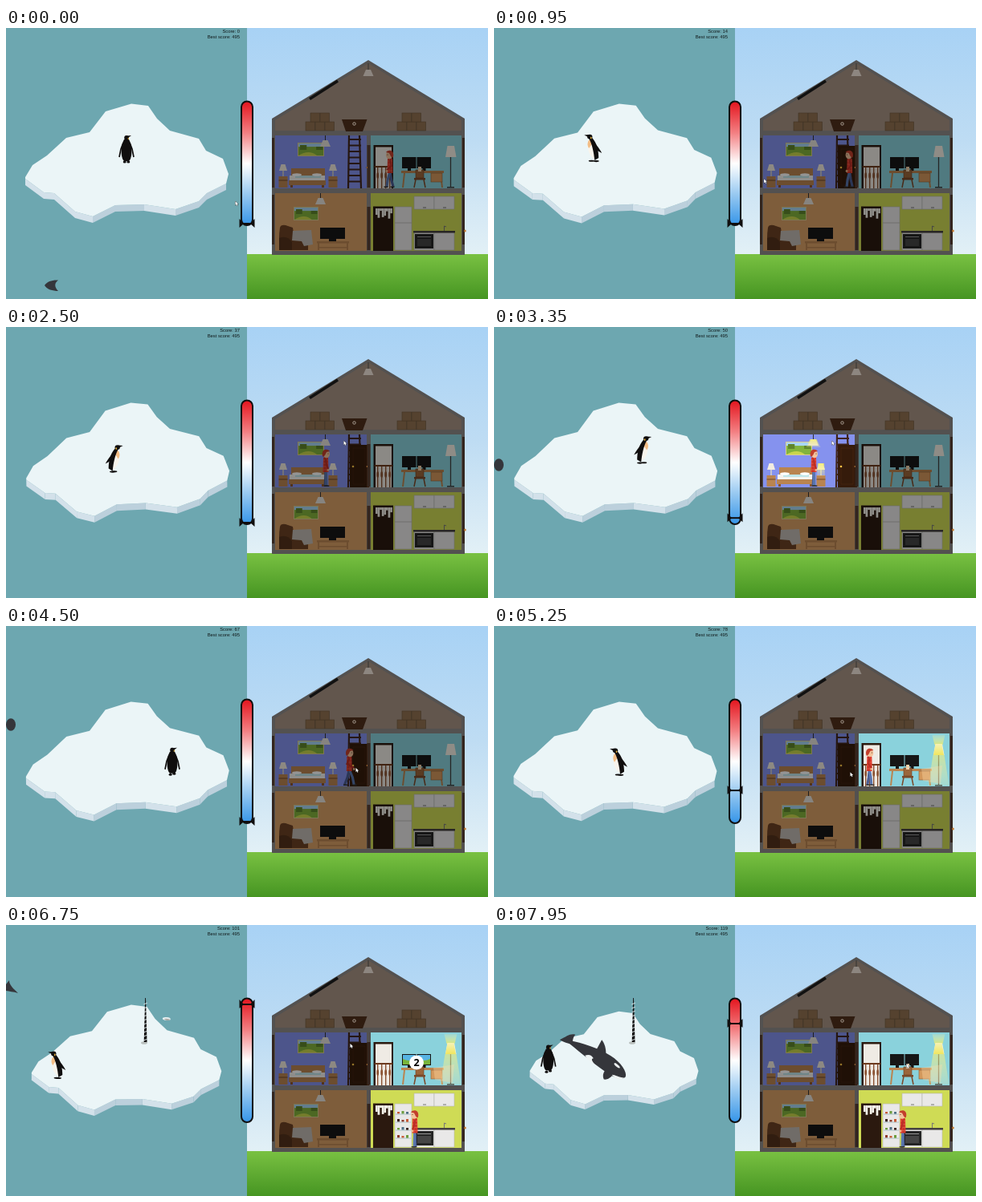
Recreate the animation shown at these times as an HTML page with a canvas. Size 600 px wide and 338 px high, loop 8000 ms.

```html
<!DOCTYPE html>
<html lang="en">
<head>
<meta charset="utf-8">
<title>Penguin and house</title>
<style>
html, body { margin: 0; width: 100%; height: 100%; overflow: hidden; }
canvas { display: block; width: 100vw; height: 100vh; }
</style>
</head>
<body>
<canvas id="stage" width="600" height="338"></canvas>
<script>
const ctx = document.getElementById('stage').getContext('2d');
const DARK = '#2b190f', WOOD = '#b98450', STONE = '#535150', INK = '#100e0e', SEA = '#35363b';

// Drawing helpers
function rect(color, x, y, w, h) { ctx.fillStyle = color; ctx.fillRect(x, y, w, h); }
function poly(color, ...p) {
  ctx.fillStyle = color;
  ctx.beginPath();
  for (let i = 0; i < p.length; i += 2) ctx.lineTo(p[i], p[i + 1]);
  ctx.fill();
}
function line(color, width, ...p) {
  ctx.strokeStyle = color; ctx.lineWidth = width;
  ctx.beginPath();
  for (let i = 0; i < p.length; i += 2) ctx.lineTo(p[i], p[i + 1]);
  ctx.stroke();
}
function oval(color, x, y, rx, ry, turn = 0) {
  ctx.fillStyle = color;
  ctx.beginPath(); ctx.ellipse(x, y, rx, ry, turn, 0, 7); ctx.fill();
}
function shape(color, path) { ctx.fillStyle = color; ctx.fill(new Path2D(path)); }
function fade(y0, y1, ...colors) {
  const g = ctx.createLinearGradient(0, y0, 0, y1);
  colors.forEach((c, i) => g.addColorStop(i / (colors.length - 1), c));
  return g;
}
function at(x, y, draw, sx = 1, turn = 0, sy = 1) {
  ctx.save(); ctx.translate(x, y); ctx.rotate(turn); ctx.scale(sx, sy); draw(); ctx.restore();
}
// Timing helpers: 0 to 1 between two times, and a test for being between them
const ramp = (t, a, b) => Math.min(1, Math.max(0, (t - a) / (b - a)));
const within = (t, a, b) => t >= a && t < b;

// Ice side: far and near shore
const BACK = [24,186, 33,171, 51,159, 75,137, 104,130, 124,104, 156,94.5, 177,97,
  188,113, 204,128, 240,138, 249,153, 270,163, 277,182];
const FRONT = [274,194, 250,206, 240,216, 211,226, 172,220, 136,221, 108,235, 86,229, 60,206, 47,205, 24,188];

function iceberg(t) {
  const size = 1 - 0.0875 * Math.max(0, t - 6), sway = Math.sin(t * Math.PI / 6);
  at(150.5 + .9 * sway, 171, () => {
    ctx.translate(-150.5, -171);
    for (let i = 0; i < FRONT.length - 2; i += 2) {
      const [x, y, u, v] = FRONT.slice(i, i + 4);
      poly(v > y ? '#bcd0dc' : '#d3e1ea', x, y, u, v, u, v + 8, x, y + 8);
    }
    poly('#ebf5f7', ...BACK, ...FRONT);
  }, size, -.02 * sway, size);
}

// The penguin walks straight legs between turning points [time, x, y]
const WALK = [[0,150,168], [.4,149,166], [1.4,104,168], [2,104,188], [3.7,205,166],
  [4.15,207,198], [4.55,207,184], [6.5,65,192], [7.2,63,192], [8,68,183]];

function penguin(t) {
  const leg = WALK.findIndex(p => p[0] > t);
  const [start, x0, y0] = WALK[leg - 1], [end, x1, y1] = WALK[leg];
  const u = ramp(t, start, end), dx = x1 - x0, dy = y1 - y0;
  const step = Math.sin(t * 18);
  const sideways = Math.abs(dx) > Math.abs(dy) || start > 6.4 && start < 7;
  at(x0 + dx * u, y0 + dy * u, () => {
    if (sideways) penguinSide(step);
    else if (dy > 0) penguinFront(step);
    else penguinBack(step);
  }, sideways && dx < 0 ? -1 : 1);
}
function penguinSide(step) {
  oval(INK, -2 + step, -1, 3.5, 1.1);
  oval(INK, 2 - step, -1.3, 3.5, 1);
  shape('#f8f4ec', 'M-3-3C4-5 9-13 7-27L2-28-3-15Z');
  shape('#f3bd85', 'M4-29C8-26 9-21 6-17L2-23Z');
  shape(INK, 'M-1-2L-6-5C-6-14-4-23 2-30L6-29C2-22 0-12-1-2Z');
  shape(INK, 'M1-26C-4-21-8-15-10-11C-5-13 0-18 3-23Z');
  oval(INK, 5, -31.5, 3.2, 2.9);
  poly(INK, 6, -34, 12, -33.5, 7, -31);
  oval('#e7b23a', 3.5, -30, .8, 1.4);
}
function penguinFront(step) {
  shape('#f8f6eb', 'M-5-27C-9-16-8-5-4-3H4C8-5 9-16 5-27Z');
  shape('#efd067', 'M-4-27H4L5-17 0-13-3-19Z');
  for (const side of [-1, 1]) {
    line(INK, 1.6, side * 4, -27, side * 7, -18, side * 9, -7);
    oval(INK, side * 2.5, -2 + side * step, 2, 1.3);
  }
  oval(INK, -1, -30, 3.8, 3.4);
  poly(INK, -4, -32, -8, -32, -4, -30);
}
function penguinBack(step) {
  shape(INK, 'M-3-29C-8-20-7-5-3-2H3C7-5 8-20 3-29Z');
  for (const side of [-1, 1]) {
    line(INK, 1.7, side * 4, -25, side * 7, -17, side * 9, -7);
    oval(INK, side * 2.3, -1 + side * step * .6, 2, 1.5);
  }
  oval(INK, 0, -31, 2.8, 3);
  poly(INK, 1, -33.5, 6, -34, 2, -31);
  oval('#b99136', 2.3, -30, .7, 1.2);
}

function orca(x, y) {
  at(x, y, () => {
    shape(SEA, 'M-40-2C-25-7-4-11 14-10 30-9 42-2 43 4 42 9 34 12 24 11 5 10-18 5-40 1Z');
    shape(SEA, 'M-36-3C-37-6-38-9-37-12-44-10-45-5-51 3-45 3-40 2-36 1Z');
    shape(SEA, 'M-5-9L-5-22C0-20 5-15 8-9Z');
    shape(SEA, 'M17 8C16 13 17 17 21 20 26 18 28 12 28 8Z');
    shape('#eef3f3', 'M42 6C36 9 31 8 27 10 32 13 40 12 42 6Z');
    shape('#eef3f3', 'M-14 5C-10 1-7 1-3 3-6 5-3 7 2 9-5 9-10 8-14 5Z');
    oval('#eef3f3', 27, -3, 4.5, 1.5, .2);
  }, 1, .5);
}

function seaLife(t) {
  if (t < .4) at(56 - 18 * t, 321, () =>
    shape(SEA, 'M-8 0C-5-5 2-7 9-6.5 4-3 4 2 9 7 2 7-5 5-8 0Z'), 1 - t);
  const emerge = ramp(t, 2.95, 3.2) - ramp(t, 4.8, 5.1);
  oval(SEA, 13 * emerge - 7, 172 - 42.6 * (t - 3.35), 6, 7.7);
  const peek = ramp(t, 5.4, 5.7) - ramp(t, 7.4, 7.6);
  at(16 * peek - 16, 77, () => shape(SEA, 'M0-3L4-8C4-2 9 2 15 8 9 6 4 6 0 5Z'));
}

function narwhal(t) {
  if (within(t, 5.5, 6.25)) oval('#91bbc2', 174, 145, 6.5, 3.8);
  if (t >= 6.25) {
    oval('#b9bfbd', 172, 147, 4, 1.8);
    at(173.6, 146, () => {
      poly(INK, -.4, -55, .4, -55, 1.9, 0, -1.9, 0);
      for (let y = -48; y < 0; y += 5) line('#dfe9eb', 1, -2.2, y + 1, 2.2, y - .8);
    }, 1, 0, ramp(t, 6.2, 6.5));
  }
  if (within(t, 6.35, 7.2)) {
    const s = t - 6.35;
    at(173 + 67 * s, 145 - 130 * s + 150 * s * s, () => {
      oval('#e8eff1', 0, 0, 5, 2);
      oval('#a9a9a4', 1, .8, 3.5, 1);
    }, 1, -.3 + s);
  }
  const leap = ramp(t, 7.55, 7.95);
  if (leap > 0) orca(-50 + 178 * leap, 75 + 90 * leap ** 1.3);
}

// House side
function picture(x, y, w, h) {
  rect('#d9cd8f', x, y, w, h);
  rect('#a9d7f4', x + 1, y + 1, w - 2, h * .3);
  rect('#82b33c', x + 1, y + h * .3, w - 2, h * .7 - 1);
  shape('#c9d64c', `M${x + 1} ${y + h - 1}q${w * .4}-8 ${w * .7} 0Z`);
  rect('#5f852c', x + 3, y + 3, w * .25, 6);
  rect('#5f852c', x + w * .7, y + 5, w * .25, 4);
}
function ceilingLamp(x, y, drop, color = '#e6e2dc') {
  line('#333', 1, x, y, x, y + drop);
  poly(color, x - 3, y + drop, x + 3, y + drop, x + 6.5, y + drop + 8, x - 6.5, y + drop + 8);
}
function tableLamp(x) {
  rect(WOOD, x - 5.5, 185, 11, 14);
  line('#70492b', 1, x - 5.5, 190, x + 5.5, 190);
  line('#d9d3c9', 1.5, x, 176, x, 185);
  poly('#f2ece0', x - 2.5, 170, x + 2.5, 170, x + 5, 178, x - 5, 178);
}
function framed(fill, edge, x, y, w, h) {
  rect(fill, x, y, w, h);
  ctx.strokeStyle = edge; ctx.lineWidth = .6; ctx.strokeRect(x, y, w, h);
}
const carton = (x, y) => framed('#55422f', '#403224', x, y, 11.5, 11);
const cabinet = (x, y, w, h) => framed('#e9e8e8', '#b5b5ad', x, y, w, h);

function shell() {
  poly(STONE, 451, 40, 571, 113, 571, 283, 331, 283, 331, 113);
  poly('#62564d', 451, 44, 567, 115, 567, 128, 335, 128, 335, 115);
  line('#111', 3.5, 378, 88.5, 413, 66);
  ceilingLamp(451, 44, 8, '#8d8680');
  for (const x of [373, 487]) {
    for (let i = 0; i < 3; i++) carton(x + 12 * i, 117);
    for (let i = 0; i < 2; i++) carton(x + 6 + 12 * i, 106);
  }
  poly('#2f1c10', 418, 114, 449.5, 114, 444, 129, 423, 129);
  ctx.strokeStyle = '#c9c0b5'; ctx.lineWidth = .8;
  ctx.beginPath(); ctx.arc(433.5, 119.5, 1.7, 0, 7); ctx.stroke();
}

function bedroom(open) {
  rect('#8592ee', 335, 134, 114, 66);
  picture(363, 143, 33, 17);
  ceilingLamp(397.5, 134, 6);
  rect(WOOD, 355, 175, 42, 12);
  rect('#f4f2ee', 353, 184, 44, 7);
  rect('#bfe5e8', 360, 184, 32, 3);
  for (const x of [362, 387]) oval('#fff', x, 183, 6, 1.8);
  rect(WOOD, 352, 190, 46, 6);
  for (const x of [354, 393]) rect('#8b562e', x, 196, 3, 3);
  for (const x of [345, 407]) tableLamp(x);
  line('#40251b', 2.2, 427, 134, 426, 200);
  line('#40251b', 2.2, 440, 134, 442, 200);
  for (let y = 139; y < 199; y += 7.5) line('#40251b', 2, 426, y, 442, y);
  if (open) {
    rect('#351b0b', 428, 147, 24, 53);
    framed('#351b0b', '#4b2913', 432, 151, 15, 45);
    oval('#ffc747', 432, 174, 1.3, 1.3);
  }
}

function monitor(x, on) {
  rect('#161616', x, 161, 17.5, 14);
  rect('#161616', x + 7, 175, 4, 3);
  if (on) {
    rect('#57b4e4', x + 1, 162, 15.5, 12);
    shape('#79b53b', `M${x + 1} 167q8 4 15.5 0V174H${x + 1}Z`);
  }
}
function study(on) {
  rect('#8ad2dc', 454, 134, 113, 66);
  rect(DARK, 457.5, 146, 24.5, 54);
  rect('#efebe4', 460, 148.5, 20, 51.5);
  line('#6c3a1e', 2, 459, 173, 481, 173);
  for (let x = 462; x < 480; x += 5) {
    rect('#8a5232', x, 174, 1.4, 26);
    oval('#8a5232', x + .7, 184, 1.4, 4);
  }
  monitor(493, on); monitor(511.5, on);
  rect(WOOD, 492, 178, 53, 3);
  line(WOOD, 2, 496, 181, 494, 199);
  line(WOOD, 2, 541, 181, 543, 199);
  framed('#d3985c', '#8f5d34', 529, 181, 14, 11);
  framed('#9a653b', '#6a3f22', 510, 177, 10, 10);
  rect('#efd0aa', 513, 173, 4, 6);
  rect('#7b4929', 508, 187, 14, 2.5);
  line('#7b4929', 1.5, 510, 189, 508, 199);
  line('#7b4929', 1.5, 520, 189, 522, 199);
  line('#3f3f3f', 1.3, 553.5, 160, 553.5, 199);
  rect('#3f3f3f', 549, 198, 9, 1.5);
  poly('#f5f1e6', 549.5, 147, 558, 147, 560.5, 161, 547, 161);
}

function livingRoom() {
  rect('#d9a066', 335, 206, 114, 72);
  picture(358, 223, 31, 17);
  ceilingLamp(391.5, 206, 6);
  shape('#6c4224', 'M341 249Q342 245 348 246L357 249 359 263H372Q377 264 376 277H341Q339 262 341 249Z');
  shape('#55321b', 'M340 262Q350 258 356 267V277H340Z');
  poly('#c0bab2', 357, 253, 380, 252, 382, 270, 371, 272, 368, 266, 356, 265);
  rect('#171717', 391, 249, 31, 14);
  rect('#171717', 402, 263, 9, 3);
  rect(WOOD, 387, 266, 40, 2.5);
  for (const x of [388, 424]) rect(WOOD, x, 268, 2, 9);
  rect(WOOD, 388, 273, 38, 1.5);
}

function kitchen(fridgeOpen) {
  rect('#cfdb55', 454, 206, 113, 72);
  rect(DARK, 457, 222.5, 25, 55.5);
  for (let i = 0; i < 8; i++) rect('#f4f2ea', 460 + i * 2.6, 225, 2.7, 8 + 5 * Math.sin(i * 2.3));
  cabinet(484, 223, 21, 54);
  if (fridgeOpen) {
    const food = ['#c85a36', '#4f6f86', '#8d3a2b', '#6c9d3e', '#3a211b'];
    for (let i = 0; i < 12; i++) {
      const shelf = 236 + 10 * Math.floor(i / 3);
      rect(food[i * 3 % 5], 487 + i % 3 * 5.5, shelf - 3 - i % 2, 3, 3 + i % 2);
      line('#c2d0d2', .8, 485, shelf, 504, shelf);
    }
  } else line('#a9aaa5', .7, 484, 243, 505, 243);
  for (const x of [508, 533]) {
    cabinet(x, 210, 25, 16);
    cabinet(x, 255, 25, 22);
    line('#777', 1, x + 11, 224, x + 15, 224);
  }
  rect('#45413f', 507, 253, 52, 2.5);
  rect('#252525', 509, 257, 23, 18);
  rect('#454545', 512, 263, 17, 9);
  line('#999', 1, 512, 260.5, 529, 260.5);
  line('#777', 1, 545.5, 253, 545.5, 247, 548, 248);
}

function walls() {
  for (const x of [331, 568]) for (const y of [137, 208]) rect('#33251e', x, y, 3, 62);
  rect('#33251e', 449.5, 146, 4, 53);
  rect('#33251e', 449.5, 223, 4, 54);
  rect('#8d5b2d', 448.5, 173, 1.5, 2);
  oval('#c97f35', 571.5, 253, 1.3, 1.6);
}

function man(t) {
  const x = 478 - 80 * ramp(t, 0, 2.15) + 104 * ramp(t, 3.95, 5.9) - 32 * ramp(t, 6.05, 6.35)
    + 39 * ramp(t, 6.35, 6.7);
  const left = t < 2.15 || within(t, 6.05, 6.35) || t >= 6.7;
  const walking = !within(t, 2.15, 3.95) && !within(t, 5.9, 6.05) && t < 6.7;
  const stride = walking ? 4 + 2 * Math.sin(t * 13) : .8;
  at(x, t < 6.35 ? 199 : 277.5, () => {
    line('#4a5c92', 3.2, 0, -20, -stride * .4, -10, -stride, -1);
    line('#5a76ae', 3.2, 0, -20, stride * .7, -10, stride, -1);
    for (const side of [-1, 1]) rect('#333', side * stride - 1.5, -1.5, 5, 1.5);
    shape('#dd3a2c', 'M-3-36Q0-38 3-36L3.5-18H-3.5Z');
    line('#922c25', .6, -1, -36, -1, -18);
    for (let y = -33; y < -19; y += 4) line('#f17a5d', .5, -3, y, 3, y);
    line('#b92f25', 2.2, 0, -34, walking ? -stride * .5 : 1, -27, walking ? stride : 3, -22);
    oval('#efb78c', walking ? stride : 3, -20.5, 1.4, 1.4);
    oval('#f3c39b', 1, -40.5, 4, 4.8);
    shape('#c23f2c', 'M-4-38C-6-47 2-48 5-44L1-43-1-39-3-37Z');
    oval('#2b1b15', 3, -41, .5, .6);
  }, left ? -1 : 1);
}

function glow(x, top, bottom, near, far, from, to) {
  poly(fade(top, bottom, from, to), x - near, top, x + near, top, x + far, bottom, x - far, bottom);
}

function house(t) {
  const bedLit = within(t, 3, 3.95), studyLit = t >= 4.9, kitchenLit = t >= 6.4;
  const screens = within(t, 5.9, 7.15);
  shell();
  bedroom(t >= .7);
  study(screens);
  livingRoom();
  kitchen(t >= 6.6);
  walls();
  man(t);
  const shade = 'rgba(0,0,0,.42)';
  if (!bedLit) rect(shade, 335, 134, 114, 66);
  if (!studyLit) rect(shade, 454, 134, 113, 66);
  if (!kitchenLit) rect(shade, 454, 206, 113, 72);
  rect(shade, 335, 206, 114, 72);
  const warm = 'rgba(245,238,90,.75)', pale = 'rgba(255,246,170,.2)';
  if (bedLit) {
    glow(407, 170, 186, 4, 5, warm, pale);
    glow(397.5, 140, 150, 4, 9, warm, pale);
  }
  if (studyLit) {
    glow(553.5, 136, 148, 8, 5, pale, warm);
    glow(553.5, 147, 161, 4, 6.5, '#f6f2b4', '#f0e660');
    glow(553.5, 161, 199, 7, 13, 'rgba(245,238,120,.6)', pale);
    poly('rgba(255,220,170,.35)', 532, 178, 558, 174, 556, 197, 534, 193);
  }
  if (screens) {
    oval('#fff', 511, 171.5, 9, 9);
    ctx.fillStyle = '#000'; ctx.textAlign = 'center';
    ctx.font = 'bold 12.5px "Open Sans", sans-serif';
    ctx.fillText('2', 511, 176);
  }
}

function gauge(t) {
  const y = 244 - 10 * (ramp(t, 3, 3.6) - ramp(t, 3.95, 4.4)) - 145 * ramp(t, 4.7, 6.75) + 24 * ramp(t, 7, 7.95);
  ctx.beginPath();
  ctx.roundRect(293, 91.5, 14, 154.5, 7);
  ctx.fillStyle = fade(92, 246, '#e4161f', '#f37f82', '#fff', '#98c9f1', '#3595e8');
  ctx.fill();
  ctx.strokeStyle = INK; ctx.lineWidth = 2; ctx.stroke();
  line(INK, 2, 293, y, 307, y);
  for (const side of [-1, 1]) poly(INK, 300 + side * 9.5, y - 6, 300 + side * 4, y, 300 + side * 9.5, y + 5);
}

function pointer(t) {
  const toLamp = ramp(t, .5, 1.7), toDoor = ramp(t, 4, 4.5), back = ramp(t, 6.1, 6.7), toDesk = ramp(t, 6.9, 7.2);
  const x = 285.5 + 135 * toLamp + 15 * toDoor + 16 * ramp(t, 4.6, 5.9) - 23 * back + 85 * toDesk;
  const y = 216 - 74 * toLamp + 35 * toDoor + 11 * ramp(t, 4.6, 5.9) - 40 * back + 25 * toDesk;
  at(x, y, () => {
    const arrow = 'M0 0V5L1.2 4 2 5.7 2.8 5.2 2 3.6H3.6Z';
    ctx.strokeStyle = '#222'; ctx.lineWidth = .7; ctx.stroke(new Path2D(arrow));
    shape('#fff', arrow);
  });
}

function score(t) {
  ctx.fillStyle = '#101819'; ctx.textAlign = 'right';
  ctx.font = '5.8px "Liberation Sans", Arial, sans-serif';
  ctx.fillText('Score: ' + Math.max(0, Math.floor(15 * t - .1)), 291, 6.4);
  ctx.fillText('Best score: 495', 291, 13);
}

function draw() {
  const t = Math.floor(performance.now() % 8000 / 50) / 20;
  rect('#6da7b0', 0, 0, 300, 338);
  rect(fade(0, 282, '#a8d2f5', '#bedcf3', '#e2f0f6'), 300, 0, 300, 283);
  rect(fade(282, 338, '#79c142', '#469522'), 300, 282, 300, 56);
  iceberg(t);
  seaLife(t);
  penguin(t);
  narwhal(t);
  score(t);
  house(t);
  gauge(t);
  pointer(t);
  requestAnimationFrame(draw);
}
draw();
</script>
</body>
</html>
```
